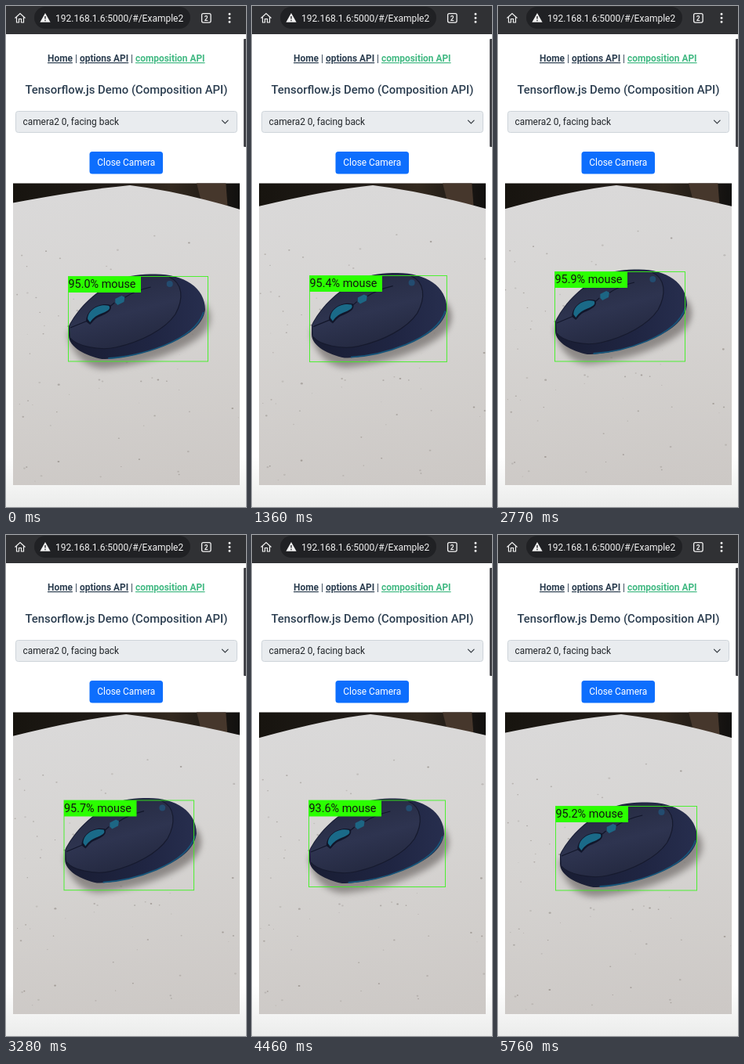
These frames come from a looping animation (306 px wide and 640 px high, 5.84 s). An HTML page:

```html
<!DOCTYPE html>
<html lang="en">
<head>
<meta charset="utf-8">
<title>Object detection demo</title>
<style>
  html, body { margin: 0; width: 100%; height: 100%; overflow: hidden; background: #fff; }
  svg { display: block; width: 306px; height: 640px; font: 11.9px Roboto, sans-serif; }
  .nav { font-weight: 700; text-decoration: underline; }
</style>
</head>
<body>
<svg viewBox="0 0 306 640">
  <defs>
    <linearGradient id="page" x2="0" y2="1">
      <stop offset="0" stop-color="#fff"/><stop offset="1" stop-color="#ebeceb"/>
    </linearGradient>
    <linearGradient id="table" x1=".45" y1="0" x2=".55" y2="1">
      <stop offset="0" stop-color="#dad9d9"/><stop offset=".45" stop-color="#d6d4d2"/>
      <stop offset="1" stop-color="#ccc8c5"/>
    </linearGradient>
    <linearGradient id="room">
      <stop offset="0" stop-color="#17140f"/><stop offset=".45" stop-color="#211c18"/>
      <stop offset=".7" stop-color="#33291f"/><stop offset="1" stop-color="#11100f"/>
    </linearGradient>
    <linearGradient id="shell" x1=".2" y1="0" x2=".6" y2="1">
      <stop offset="0" stop-color="#24293f"/><stop offset=".55" stop-color="#2e3450"/>
      <stop offset="1" stop-color="#23283f"/>
    </linearGradient>
    <linearGradient id="side" x2="1">
      <stop offset="0" stop-color="#191d33"/><stop offset=".6" stop-color="#1f2542"/>
      <stop offset="1" stop-color="#272e4e"/>
    </linearGradient>
    <filter id="soft" x="-30%" y="-30%" width="160%" height="160%"><feGaussianBlur stdDeviation="4"/></filter>
    <filter id="blur"><feGaussianBlur stdDeviation=".7"/></filter>
    <clipPath id="view"><rect x="9" y="226.5" width="289" height="385.5"/></clipPath>
  </defs>

  <rect width="306" height="640" fill="#fff"/>
  <rect y="575" width="306" height="65" fill="url(#page)"/>

  <!-- browser bar -->
  <rect width="306" height="36" fill="#303134"/>
  <rect x="36" y="1" width="199" height="28" rx="14" fill="#202124"/>
  <path d="M11.500 15.500 18 9.500l6.500 6M13.500 14.500V21h3v-4.500h3V21h3v-6.500" fill="none" stroke="#f1f1f1" stroke-width="1.200"/>
  <path d="M50 9l6.600 11.800H43.400Z" fill="#f1f1f1"/>
  <path d="M50 13v3.600m0 1.200v1.400" stroke="#202124" stroke-width="1.300"/>
  <text x="63" y="19.500" font-size="12" fill="#f1f1f1">192.168.1.6:5000/#/Example2</text>
  <rect x="249.600" y="9.600" width="11.500" height="11.500" rx="2" fill="none" stroke="#f1f1f1" stroke-width="1.300"/>
  <text x="255.300" y="18.500" font-size="8.500" font-weight="700" text-anchor="middle" fill="#f1f1f1">2</text>
  <path d="M285 10.200v0m0 5v0m0 5v0" stroke="#f1f1f1" stroke-width="3" stroke-linecap="round"/>

  <!-- page -->
  <g fill="#2c3e50">
    <text class="nav" x="53" y="71">Home</text>
    <text x="88" y="71">|</text>
    <text class="nav" x="94" y="71">options API</text>
    <text x="159" y="71">|</text>
    <text class="nav" x="165" y="71" fill="#42b983">composition API</text>
    <text x="153.500" y="112" font-size="14.860" font-weight="500" text-anchor="middle">Tensorflow.js Demo (Composition API)</text>
  </g>
  <rect x="12.500" y="134.500" width="282" height="27" rx="3" fill="#e9ecef" stroke="#ced4da"/>
  <text x="21.500" y="152" fill="#212529">camera2 0, facing back</text>
  <path d="M275.500 146.200l3.800 3.800 3.800-3.800" fill="none" stroke="#343a40" stroke-width="1.200" stroke-linecap="round"/>
  <rect x="106.500" y="186" width="93.500" height="28.500" rx="3.500" fill="#0d6efd"/>
  <text x="153.300" y="204.300" text-anchor="middle" fill="#fff">Close Camera</text>
  <rect x="303" y="42" width="4" height="138" rx="1" fill="#434449"/>

  <!-- camera picture -->
  <g clip-path="url(#view)">
    <rect x="9" y="226" width="289" height="60" fill="url(#room)"/>
    <path d="M242 222h38l3 40h-31Z" fill="#46372c"/>
    <path id="top" fill="url(#table)" filter="url(#blur)"/>
    <g id="specks" fill="#7d756e"></g>
    <g id="mouse">
      <path d="M79 416C82 446 105 465 128 463C172 459 226 441 249 420C262 407 262 392 252 380Z" fill="#807b79" opacity=".85" filter="url(#soft)"/>
      <g filter="url(#blur)">
        <path d="M80 409C89 390 111 365 139 352C157 343 172 342.500 190 342.500C226 342.500 253 360 253 388C250 409 230 422 203 433C177 444 144 451 122 451C102 447 80 436 80 421Z" fill="url(#side)"/>
        <path d="M130 450C168 448 239 429 251 391" fill="none" stroke="#17557a" stroke-width="1.800"/>
        <path d="M81 409C90 390 113 366 139 353C160 344 190 342 207 346C225 354 226 374 215 394C202 413 172 429 140 436C119 441 88 434 82 424Z" fill="url(#shell)"/>
        <path d="M82 424C89 434 119 441 140 436C172 429 202 413 215 394C226 374 225 354 207 346" fill="none" stroke="#161a2e" stroke-width="1.200"/>
        <path d="M82 411L104 402M131 385L138 379M150 373C160 366 171 362 184 359" fill="none" stroke="#12162a" stroke-width="1.200"/>
        <path d="M102 403C102 388 119 378 133 382C136 389 128 393 121 396C114 398 111 403 107 407Z" fill="#11162a"/>
        <path d="M104 400C104 388 119 380 131 383C134 388 128 390 121 393C113 396 110 400 107 404Z" fill="#1a6a88"/>
        <path d="M139 374l8-4 4 2-1 6-8 4-3-3Z" fill="#1d6684"/>
        <circle cx="208" cy="355" r="4" fill="#234c70"/>
      </g>
    </g>
  </g>

  <!-- detection -->
  <rect id="box" fill="none" stroke="#35f516" stroke-opacity=".85"/>
  <rect id="tag" width="92.500" height="20.500" fill="#2bff00"/>
  <text id="label" font-size="14.400" fill="#101510"></text>
</svg>
<script>
const LOOP = 5840, STEP = 70;
const $ = id => document.getElementById(id);

// key poses: time, mouse x, mouse y, box x, box y, box width, score
const KEYS = [
  [0, 80, 343, 79.5, 345.5, 178, 95.0],
  [700, 77, 344, 72.5, 345, 173, 94.7],
  [2000, 75, 339, 74.5, 343.5, 177, 96.2],
  [2770, 73, 337, 72.5, 339.5, 166, 95.9],
  [3760, 78, 336, 75.5, 338, 165, 95.5],
  [4460, 73, 337, 72.5, 339, 174, 93.6],
  [5740, 79, 342, 73.5, 346.5, 180, 95.2]
];

function pose(t) {
  const i = Math.max(1, KEYS.findIndex(k => k[0] > t));
  const n = t >= KEYS.at(-1)[0] ? KEYS.length - 1 : i;
  const a = KEYS[n - 1], b = KEYS[n];
  const p = Math.min(1, (t - a[0]) / (b[0] - a[0]));
  const e = p * p * (3 - 2 * p);
  return a.slice(1).map((v, k) => v + (b[k + 1] - v) * e);
}

function set(id, attrs) {
  for (const k in attrs) $(id).setAttribute(k, attrs[k]);
}

let seed = 17;
const rand = () => (seed = seed * 16807 % 2147483647) / 2147483647;
let dots = '';
for (let i = 0; i < 70; i++) {
  const x = 5 + rand() * 300, y = 290 + rand() * 325, r = .4 + rand() * .8;
  dots += `<ellipse cx="${x}" cy="${y}" rx="${r * 1.3}" ry="${r}" opacity="${.2 + rand() * .4}"/>`;
}
$('specks').innerHTML = dots;

function draw(t) {
  const [mx, my, bx, by, bw, score] = pose(t);

  // a nearer camera widens the mouse and its box alike
  const scale = (85 + bw / 2) / 173;
  const move = `translate(${mx} ${my}) scale(${scale} 1) translate(-80 -343)`;
  set('mouse', { transform: move });
  set('specks', { transform: move });

  const left = 258 - (mx - 76) * 1.2, right = 261 + (my - 340) * .8, apex = mx + 78;
  set('top', { d: `M0 ${left}Q95 235 ${apex} 229Q${apex + 67} 237 310 ${right}V625H0Z` });

  const x = Math.round(bx * 2) / 2, y = Math.round(by * 2) / 2;
  set('box', { x, y, width: bw, height: 197.5 - bw / 2 });
  set('tag', { x, y });
  set('label', { x, y: y + 14.8 });
  $('label').textContent = score.toFixed(1) + '% mouse';
}

const start = performance.now();
function tick() {
  const t = (performance.now() - start) % LOOP;
  // keys fall between steps, so each step shows its middle
  const key = KEYS.find(k => Math.abs(k[0] - t) < STEP / 2);
  draw(key ? key[0] : Math.floor(t / STEP) * STEP);
  requestAnimationFrame(tick);
}
tick();
</script>
</body>
</html>
```
